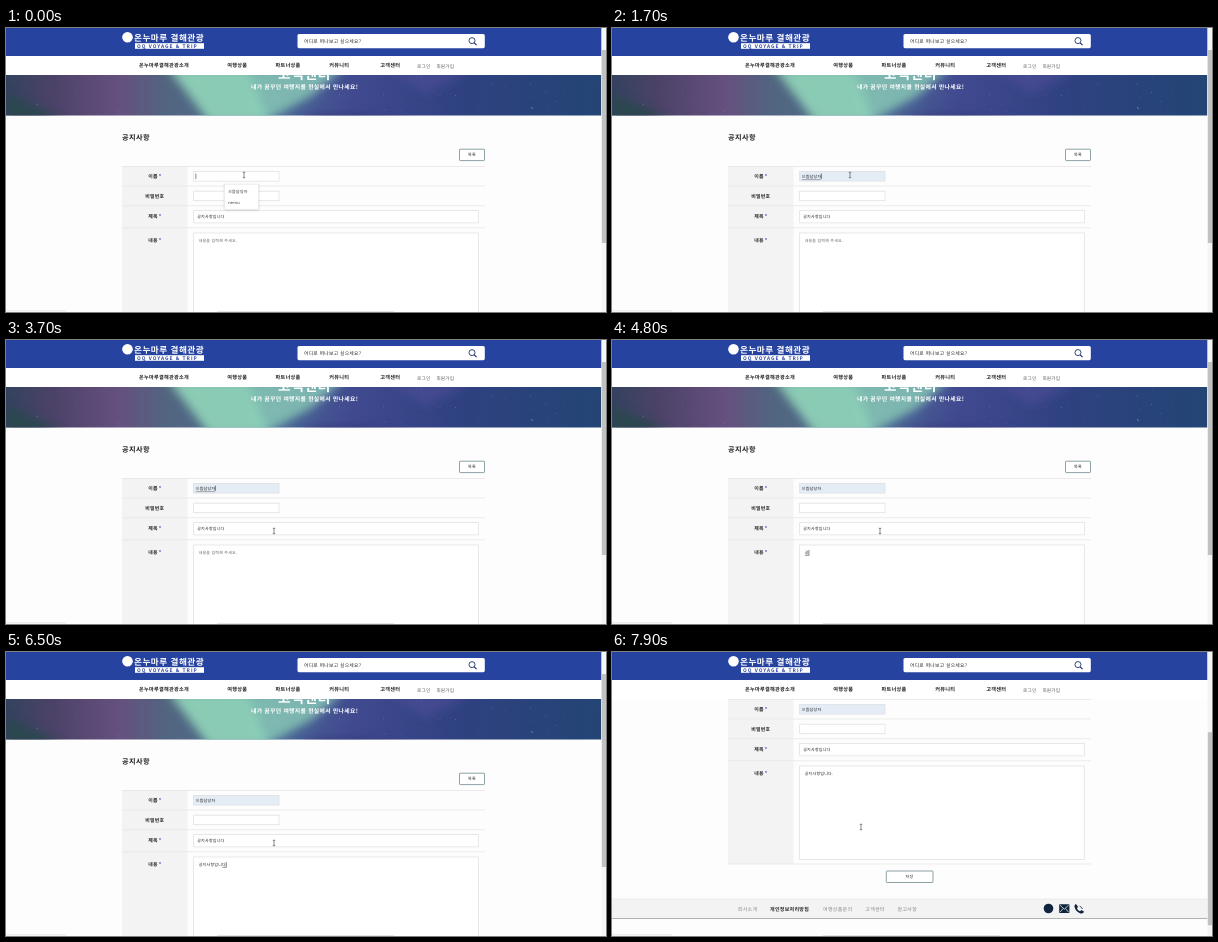
These frames come from a looping animation (600 px wide and 284 px high, 8 s). An HTML page:

```html
<!DOCTYPE html>
<html lang="ko">
<head>
<meta charset="utf-8">
<title>공지사항</title>
<style>
html, body { margin: 0; width: 100%; height: 100%; overflow: hidden; background: #fdfdfd; }
svg { display: block; width: 600px; height: 284px; }
text { font-family: "Noto Sans CJK KR", "Noto Sans CJK", "Noto Sans", sans-serif; font-size: 4px; letter-spacing: .055em; fill: #222; white-space: pre; text-rendering: geometricPrecision; }
.b { font-weight: 700; }
.mid { text-anchor: middle; }
.value { font-weight: 500; }
.nav text { font-size: 5.15px; font-weight: 700; fill: #1c1c1c; }
.nav .sub { font-size: 4.6px; font-weight: 400; fill: #555; }
.label text { font-size: 4.9px; font-weight: 700; }
.label .star { fill: #2b4a9e; }
.foot text { font-size: 5px; fill: #8a8a8a; }
.foot .b { fill: #222; }
.line { stroke: #e4e4e4; stroke-width: .7; }
.field { fill: #fff; stroke: #dcdee0; stroke-width: .7; }
.btn { fill: #fff; stroke: #5d7a80; stroke-width: .7; }
.caret { stroke: #333; stroke-width: .6; }
</style>
</head>
<body>
<svg viewBox="0 0 600 284">
  <defs>
    <linearGradient id="sky">
      <stop offset="0" stop-color="#34425f"/>
      <stop offset=".08" stop-color="#4c4268"/>
      <stop offset=".19" stop-color="#65507f"/>
      <stop offset=".27" stop-color="#51657f"/>
      <stop offset=".42" stop-color="#4d6f95"/>
      <stop offset=".58" stop-color="#414a90"/>
      <stop offset=".76" stop-color="#2f4180"/>
      <stop offset="1" stop-color="#234574"/>
    </linearGradient>
    <filter id="soft" x="-30%" y="-60%" width="160%" height="220%"><feGaussianBlur stdDeviation="5"/></filter>
    <filter id="shade" x="-20%" y="-20%" width="140%" height="150%"><feDropShadow dx="0" dy=".6" stdDeviation=".8" flood-opacity=".18"/></filter>
    <clipPath id="photo"><rect y="0" width="595.5" height="87.5"/></clipPath>
  </defs>

  <g id="page">
    <g clip-path="url(#photo)">
      <rect width="595.5" height="88" fill="url(#sky)"/>
      <g filter="url(#soft)">
        <path d="M162 40H240L262 95H204Z" fill="#96dcbc" opacity=".85"/>
        <path d="M238 40H338L306 68L256 95Z" fill="#8fd3ba" opacity=".75"/>
        <path d="M0 92V66Q30 78 60 92Z" fill="#2c4650"/>
        <path d="M290 95Q320 72 420 95Z" fill="#3a3c80" opacity=".7"/>
        <path d="M380 40H470L420 66Z" fill="#54509c" opacity=".5"/>
      </g>
      <g id="stars" fill="#fff"></g>
    </g>
    <text class="b mid" x="298.5" y="50.5" style="font-size:13.6px;fill:#fff">고객센터</text>
    <text class="b" x="245" y="61.2" style="font-size:5.85px;fill:#fff">내가 꿈꾸던 여행지를 현실에서 만나세요!</text>

    <text class="b" x="116" y="111.8" style="font-size:7.15px">공지사항</text>
    <rect class="btn" x="453.5" y="121.2" width="25" height="11.4" rx=".8"/>
    <text class="mid value" x="466" y="128.4">목록</text>

    <rect x="116" y="138.5" width="65.5" height="164.5" fill="#f3f3f3"/>
    <path class="line" d="M116 138.5H479M116 158H479M116 177.7H479M116 199.8H479M116 303H479"/>
    <g class="label">
      <text x="142.2" y="150">이름<tspan class="star" dx="1">*</tspan></text>
      <text x="139.2" y="169.6">비밀번호</text>
      <text x="142.2" y="190.2">제목<tspan class="star" dx="1">*</tspan></text>
      <text x="142.2" y="214.3">내용<tspan class="star" dx="1">*</tspan></text>
    </g>
    <rect class="field" id="nameBox" x="187.7" y="143.6" width="85.3" height="9.5"/>
    <rect class="field" x="187.7" y="163.2" width="85.3" height="9.5"/>
    <rect class="field" x="187.7" y="182.3" width="284.8" height="12.6"/>
    <rect class="field" x="187.7" y="205" width="284.8" height="93.5"/>
    <text id="name" class="value" x="189.8" y="150">으뜸담당자</text>
    <path id="nameLine" d="M189.8 151.6H209" stroke="#777" stroke-width=".6"/>
    <text class="value" x="191.2" y="190.2">공지사항입니다</text>
    <text id="hint" x="192.7" y="214.1" style="font-size:3.95px;fill:#666">내용을 입력해 주세요.</text>
    <text id="body" class="value" x="192.7" y="214.1"></text>
    <path id="bodyLine" stroke="#333" stroke-width=".5"/>
    <path id="caret" class="caret"/>

    <g id="menu">
      <rect x="218.7" y="156.2" width="33.6" height="25" fill="#fff" stroke="#e2e2e2" stroke-width=".5" filter="url(#shade)"/>
      <text x="222.2" y="164.6" style="fill:#333">으뜸담당자</text>
      <text x="222.2" y="175.6" style="fill:#333">nemu</text>
    </g>

    <rect class="btn" x="274.3" y="310" width="46.7" height="11.5" rx=".8"/>
    <text class="mid value" x="297.5" y="317.3">저장</text>

    <rect y="338" width="595.5" height="19.5" fill="#f3f3f3"/>
    <path d="M0 338H595.5" stroke="#e6e6e6" stroke-width=".7"/>
    <path d="M0 357.5H595.5" stroke="#aaa" stroke-width=".9"/>
    <g class="foot">
      <text x="125.8" y="349.5">회사소개</text>
      <text class="b" x="158" y="349.5">개인정보처리방침</text>
      <text x="211" y="349.5">여행상품문의</text>
      <text x="253.3" y="349.5">고객센터</text>
      <text x="285.6" y="349.5">참고사항</text>
    </g>
    <g fill="#10263f">
      <circle cx="436.5" cy="347.5" r="4.8"/>
      <rect x="447.2" y="343.3" width="10.2" height="8.8" rx=".6"/>
      <path d="M448 344.2L452.3 348.2L456.6 344.2M448 351.2L451 347.6M456.6 351.2L453.6 347.6" fill="none" stroke="#fff" stroke-width=".7"/>
      <path d="M464 343L466 345.8L465 347.4Q466 349.4 468 350.2L469.5 349L472.2 350.8Q471 353 468.5 352.4Q463.4 350.6 462.4 345.2Q462.6 343.6 464 343Z"/>
      <path d="M467.6 345.2Q469.8 345.8 470.4 348" fill="none" stroke="#10263f" stroke-width=".8"/>
    </g>
  </g>

  <rect width="595.5" height="28" fill="#2743a0"/>
  <rect y="28" width="595.5" height="19" fill="#fff"/>
  <circle cx="121.5" cy="9.3" r="5.3" fill="#fff"/>
  <text class="b" x="128" y="12.5" style="font-size:8.65px;fill:#fff">온누마루 결해관광</text>
  <rect x="129" y="15.2" width="69" height="5.6" fill="#fff"/>
  <text class="b" x="131" y="19.8" style="font-size:4.9px;fill:#2743a0;letter-spacing:.95px">OQ VOYAGE &amp; TRIP</text>
  <rect x="291.5" y="6" width="187.3" height="14.2" rx="1.6" fill="#fff"/>
  <text x="298" y="14.7" style="font-size:4.8px">어디로 떠나보고 싶으세요?</text>
  <path d="M468.3 15L470.6 17.2" stroke="#1d2f74" stroke-width="1.1"/>
  <circle cx="466" cy="12.6" r="3" fill="none" stroke="#1d2f74" stroke-width=".9"/>
  <g class="nav">
    <text x="133" y="39">온누마루결해관광소개</text>
    <text x="221.3" y="39">여행상품</text>
    <text x="269.5" y="39">파트너상품</text>
    <text x="323.2" y="39">커뮤니티</text>
    <text x="374.3" y="39">고객센터</text>
    <text class="sub" x="411" y="39.5">로그인</text>
    <text class="sub" x="430.4" y="39.5">회원가입</text>
  </g>

  <rect x="595.5" width="4.5" height="284" fill="#f5f5f5"/>
  <rect id="thumb" x="595.8" width="4.2" height="193" fill="#c1c1c1"/>
  <path d="M0 282.8H60" stroke="#ececec" stroke-width="1.6"/>
  <path d="M211 283.7H388" stroke="#ccc" stroke-width=".6"/>
  <g id="mouse">
    <path id="beam" d="M-1.2 -2.7H1.2M0 -2.7V2.7M-1.2 2.7H1.2" fill="none" stroke="#555" stroke-width=".7"/>
    <path id="arrow" d="M0 0V5.6L1.3 4.4L2.2 6.4L3.1 6L2.2 4.1H4Z" fill="#fff" stroke="#444" stroke-width=".6"/>
  </g>
</svg>
<script>
const LOOP = 8000, STEP = 100;
const PICK = 300, FOCUS = 4200, TYPE = 4600, DOT = 7000;
// What each key press leaves in the text area while syllables are composed
const KEYS = "ㄱ 고 공 공ㅈ 공지 공짓 공지사 공지샇 공지사하 공지사항 공지사항ㅇ 공지사항이 공지사항입 공지사항입ㄴ 공지사항입니 공지사항입닏 공지사항입니다".split(" ");
const PATH = [[0, 238, 147], [1900, 238, 147], [2700, 224, 199], [3000, 224, 199], [3700, 268, 191],
  [7000, 268, 191], [7400, 240, 167], [7700, 240, 167], [7900, 249, 175]];
const GAPS = [[153, 163], [173, 182], [195, 205]];

const el = {};
document.querySelectorAll("[id]").forEach(e => el[e.id] = e);
const show = (e, on) => e.setAttribute("visibility", on ? "visible" : "hidden");
const move = (e, x, y) => e.setAttribute("transform", `translate(${x} ${y})`);
const ease = p => p * p * (3 - 2 * p);
const clamp = p => Math.max(0, Math.min(1, p));

let seed = 7;
const rnd = () => (seed = seed * 16807 % 2147483647) / 2147483647;
for (let i = 0; i < 40; i++) {
  const s = document.createElementNS("http://www.w3.org/2000/svg", "circle");
  s.setAttribute("cx", rnd() * 595);
  s.setAttribute("cy", 47 + rnd() * 38);
  s.setAttribute("r", .25 + rnd() * .25);
  s.setAttribute("opacity", .2 + rnd() * .4);
  el.stars.append(s);
}

function mouseAt(t) {
  const i = PATH.findIndex(p => p[0] > t);
  if (i < 0) return PATH[PATH.length - 1].slice(1);
  const [t0, x0, y0] = PATH[i - 1], [t1, x1, y1] = PATH[i];
  const p = ease((t - t0) / (t1 - t0));
  return [x0 + (x1 - x0) * p, y0 + (y1 - y0) * p];
}

function draw(t) {
  const scroll = 91 * ease(clamp((t - 7700) / 200));
  move(el.page, 0, -scroll);
  el.thumb.setAttribute("y", 22 + scroll * .64);

  const picked = t >= PICK, typing = t >= TYPE, composing = typing && t < DOT;
  show(el.menu, !picked);
  show(el.name, picked);
  show(el.nameLine, picked && t < FOCUS);
  el.nameBox.style.fill = picked ? "#e4edf6" : "#fff";

  const key = Math.min(KEYS.length - 1, Math.floor((t - TYPE) / STEP));
  el.body.textContent = typing ? KEYS[key] + (t >= DOT ? "." : "") : "";
  show(el.hint, !typing);
  const end = 193 + (typing ? el.body.getComputedTextLength() : 0);
  show(el.bodyLine, composing);
  el.bodyLine.setAttribute("d", `M${end - 4} 215.4H${end}`);

  const inBody = t >= FOCUS;
  const x = inBody ? end : picked ? 209.4 : 189.9;
  const y = inBody ? 210 : 145.6;
  const since = t - (t >= DOT ? DOT : inBody ? FOCUS : picked ? PICK : 0);
  el.caret.setAttribute("d", `M${x} ${y}v5.4`);
  show(el.caret, composing || since % 1000 < 500);

  const [mx, my] = mouseAt(t);
  const arrow = GAPS.some(([a, b]) => my + scroll > a && my + scroll < b);
  move(el.mouse, mx, my);
  show(el.arrow, arrow);
  show(el.beam, !arrow);
}

const start = performance.now();
function tick() {
  const t = (performance.now() - start) % LOOP;
  draw(Math.floor(t / STEP) * STEP);
  requestAnimationFrame(tick);
}
tick();
</script>
</body>
</html>
```
